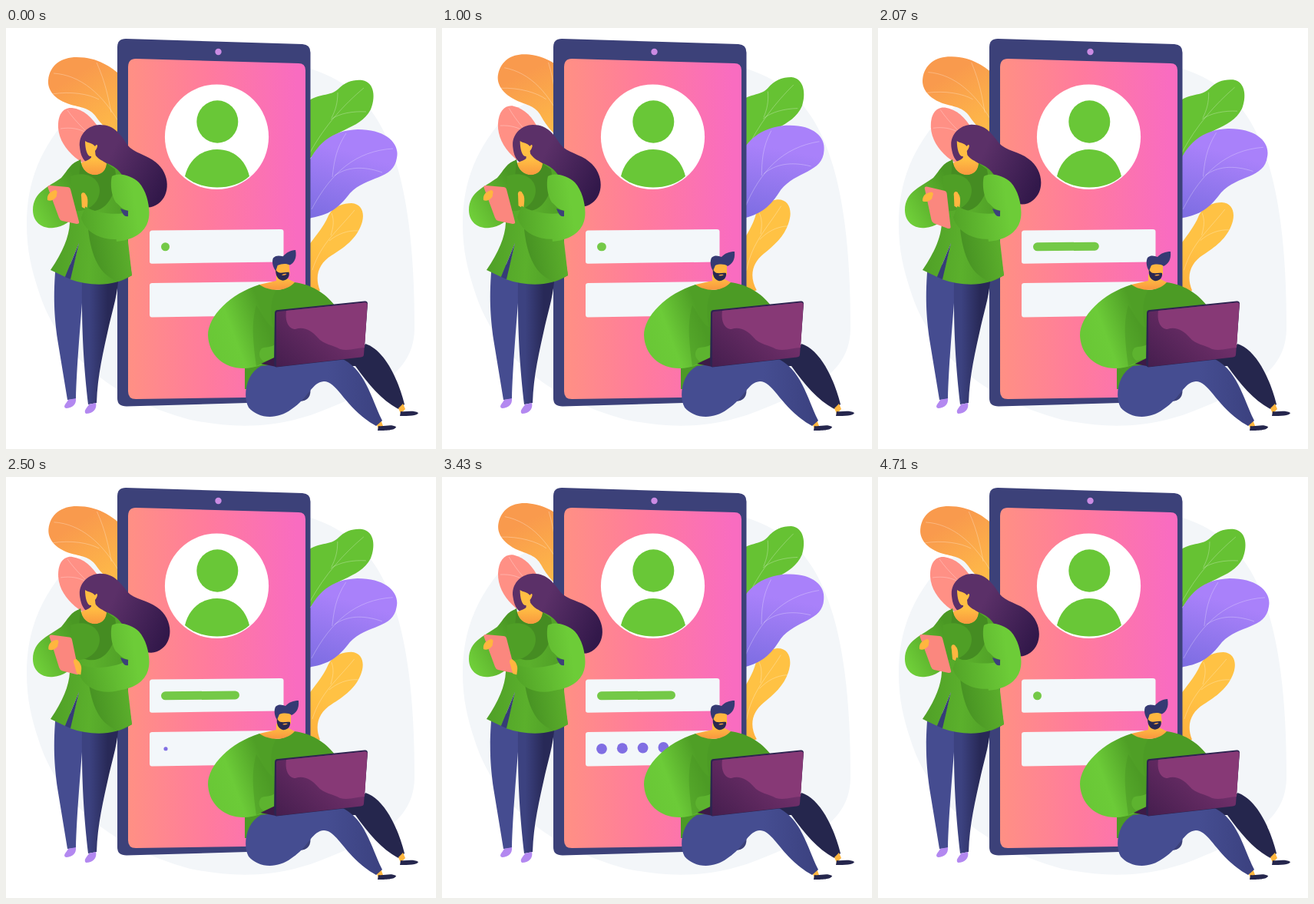
An HTML page that plays this animation: 560x548 px, repeating every 4.78 s.

```html
<!DOCTYPE html>
<html lang="en">
<head>
<meta charset="utf-8">
<title>Sign in</title>
<style>
html, body { margin: 0; width: 100%; height: 100%; overflow: hidden; background: #fff; }
svg { display: block; width: 100%; height: 100%; }
.vein { fill: none; stroke: #fff; stroke-opacity: .3; stroke-width: .9; }
</style>
</head>
<body>
<svg viewBox="0 0 560 548">
<defs>
  <linearGradient id="screen"><stop offset="0" stop-color="#ff9084"/><stop offset=".45" stop-color="#ff7b9d"/><stop offset=".95" stop-color="#f96cc0"/></linearGradient>
  <linearGradient id="orange" x1=".2" y1="0" x2=".8" y2="1"><stop offset=".2" stop-color="#f99a4d"/><stop offset="1" stop-color="#ffc247"/></linearGradient>
  <linearGradient id="violet" x1=".3" y1="1" x2=".6" y2="0"><stop offset="0" stop-color="#7d6de2"/><stop offset=".75" stop-color="#a981fa"/></linearGradient>
  <linearGradient id="yellow" x1=".3" y1="1" x2=".6" y2="0"><stop offset="0" stop-color="#ffb13e"/><stop offset=".5" stop-color="#ffc244"/></linearGradient>
  <linearGradient id="hair" x1="0" y1=".2" x2="1" y2=".7"><stop offset=".35" stop-color="#5b3068"/><stop offset="1" stop-color="#32184a"/></linearGradient>
  <linearGradient id="skin" x1="0" y1="0" x2="0" y2="1"><stop offset=".3" stop-color="#ffbe43"/><stop offset="1" stop-color="#f9973f"/></linearGradient>
  <linearGradient id="tunic" x1="0" y1=".6" x2="1" y2=".7"><stop offset="0" stop-color="#4f9f27"/><stop offset=".5" stop-color="#5bb02c"/><stop offset="1" stop-color="#4c9a25"/></linearGradient>
  <linearGradient id="fold" x1="0" y1=".6" x2="1" y2=".4"><stop offset="0" stop-color="#458f22"/><stop offset="1" stop-color="#5cb02c"/></linearGradient>
  <linearGradient id="sleeveLeft" gradientUnits="userSpaceOnUse" x1="36" y1="240" x2="96" y2="205"><stop offset="0" stop-color="#6fce39"/><stop offset=".45" stop-color="#5eb42e"/><stop offset="1" stop-color="#4a9824"/></linearGradient>
  <linearGradient id="sleeveRight" gradientUnits="userSpaceOnUse" x1="96" y1="250" x2="178" y2="238"><stop offset="0" stop-color="#52a427"/><stop offset=".9" stop-color="#6dcc38"/></linearGradient>
  <linearGradient id="arm" x1="0" y1=".7" x2="1" y2=".25"><stop offset="0" stop-color="#69c736"/><stop offset=".35" stop-color="#6ccb38"/><stop offset=".8" stop-color="#4f9f26"/></linearGradient>
  <linearGradient id="legDark"><stop offset=".2" stop-color="#3c4280"/><stop offset=".7" stop-color="#282957"/></linearGradient>
  <linearGradient id="legFront"><stop offset=".6" stop-color="#454d91"/><stop offset="1" stop-color="#3b417f"/></linearGradient>
  <linearGradient id="lid" x1="0" y1="1" x2=".9" y2=".3"><stop offset="0" stop-color="#451e4e"/><stop offset="1" stop-color="#793370"/></linearGradient>
</defs>

<path fill="#f3f6f9" d="M27 255C27 200 45 155 85 112C200 40 380 10 460 90C518 145 532 265 532 390C532 450 480 470 420 495C350 525 290 520 240 510C130 480 70 420 45 350C33 315 27 290 27 255Z"/>

<g id="leafOrange">
  <path fill="url(#orange)" d="M165 155C140 140 128 130 119 118C110 104 100 104 85 100C62 93 54 80 55 68C57 48 72 38 92 38C120 38 137 51 150 62Z"/>
  <path class="vein" d="M62 59C96 61 126 85 150 128M118 45C130 72 133 90 137 110M60 86C85 82 108 86 121 93"/>
</g>
<g id="leafPink">
  <path fill="#ff9085" d="M68 130C67 112 75 103 86 104C101 106 112 116 122 132L130 185C104 184 70 160 68 130Z"/>
  <path class="vein" d="M80 107C92 124 108 138 124 152M71 131C84 129 95 131 104 136"/>
</g>
<g id="leafGreen">
  <path fill="#66c233" d="M385 104C402 82 420 91 432 80C442 70 452 67 464 68C481 71 481 92 475 106C460 135 424 128 398 168L380 180Z"/>
  <path class="vein" d="M466 78C440 100 416 126 396 162M432 84C432 98 429 107 424 117M469 109C452 108 434 111 423 119"/>
</g>
<g id="leafYellow">
  <path fill="url(#yellow)" d="M385 295C402 272 414 259 420 244C427 231 440 228 450 228C463 229 467 240 464 252C458 274 440 286 424 296C408 306 401 322 409 342L395 346Z"/>
  <path class="vein" d="M454 237C432 264 410 280 399 315M424 241C428 251 426 260 423 270M459 264C445 263 432 268 421 277"/>
</g>
<g id="leafViolet">
  <path fill="url(#violet)" d="M385 252L390 185C403 150 425 133 458 132C495 132 513 150 509 169C505 198 470 192 448 215C432 236 420 243 398 247Z"/>
  <path class="vein" d="M504 157C456 160 424 187 398 236M443 137C429 158 427 177 425 194M490 188C464 179 444 181 428 192"/>
</g>

<path fill="#3c4179" d="M145 25Q145 14 156 14L386 21Q396.500 21.500 396.500 32V472Q396.500 485 383 486L157 492.500Q145 492.500 145 482Z"/>
<path fill="url(#screen)" d="M159 51Q159 40 169 40L381 46Q390 46 390 55V471Q390 480 381 480L169 483Q159 483 159 473Z"/>
<circle cx="276.500" cy="31" r="4.200" fill="#cb8be3"/>
<ellipse cx="274.500" cy="141.800" rx="67.600" ry="68.300" fill="#fff"/>
<g fill="#69c737">
  <ellipse cx="275.300" cy="122" rx="27" ry="27.700"/>
  <path d="M233 193C238 172 254 158 275 158C297 158 312 172 317 193C306 203 291 207.500 275 207.500C259 207.500 244 203 233 193Z"/>
</g>
<g fill="#f3f7fa">
  <path d="M187 267Q187 263.500 190.500 263.500L358 262Q361.500 262 361.500 265V301.500Q361.500 304.500 358 304.500L190 306.700Q187 306.700 187 304Z"/>
  <path d="M187 335Q187 332 190.500 332L358 330V374L190 376.500Q187 376.500 187 373Z"/>
</g>
<rect id="bar" x="202" y="279.300" width="11" height="11" rx="5.500" fill="#74c947" transform="rotate(-.5 207 285)"/>
<g id="dots" fill="#806ee3"></g>

<g id="woman">
  <path fill="#454c90" d="M65 306C61 350 63 375 67 405L80 484L91 483C92 440 97 385 100 345L104 310Z"/>
  <path fill="url(#legDark)" d="M99 320C98 400 102 445 107 490L118 488C119 452 127 420 134 388C139 366 146 345 147 318Z"/>
  <path fill="#b388f0" d="M91 482C92 490 86 495 78 495C73 493 79 488 81 484ZM117 488C119 496 113 502 104 502C100 498 107 493 108 490Z"/>
  <g id="hairGroup"><path fill="url(#hair)" d="M96 155C94 138 108 126 122 126C142 126 150 140 158 152C166 163 184 165 195 175C214 190 214 218 198 229C191 234 184 235 176 232L148 200C138 190 120 186 108 178C99 171 97 165 96 155Z"/></g>
  <path fill="url(#skin)" d="M97 176C105 172 112 172 114 162C119 171 127 173 132 177V192H101Z"/>
  <path id="face" fill="#ffbe43" d="M103 147C107 150 112 149 116 154C119 149 121 154 116 160L117 169L111 172V167C106 168 103 158 103 147Z"/>
  <path fill="url(#tunic)" d="M97 171C98 188 112 194 122 190C129 187 131 181 131 176C148 182 160 196 160 230L158 285L164 322C142 336 112 337 83 327L95 280L77 324L58 315C74 292 83 270 83 252L80 190C86 180 91 175 97 171Z"/>
  <path fill="#363c77" d="M95 280L77 324L84 327Z"/>
  <path fill="#458c22" d="M97 171C98 188 112 194 122 190C128 188 131 181 131 176L142 184C148 212 130 248 100 236L82 222V188Z"/>
  <path fill="url(#fold)" d="M107 262C111 298 122 322 146 330L164 322L158 270Z"/>
  <path fill="url(#sleeveLeft)" d="M97 172C85 174 80 186 72 195C57 206 35 213 35 237C35 253 48 262 62 260C74 259 84 252 90 243L94 205Z"/>
  <path fill="#4f9f26" d="M84 193C104 185 122 195 122 212C121 230 104 240 88 238Z"/>
  <g id="tabletGroup">
    <path fill="#fb877e" d="M57 205L80 207Q83 207 84 210L95 252Q96 255 92 255L73 251Q70 250 69 247L55 209Q53 205 57 205Z"/>
    <path fill="#ffb63f" d="M54 224C53 216 58 213 64 211C69 212 65 217 66 219C63 224 57 226 54 224Z"/>
  </g>
  <g id="forearm">
    <path id="hand" fill="#ffb640" d="M93 226C91 219 97 219 98 222C103 226 102 236 102 242L95 239Z"/>
    <path fill="url(#sleeveRight)" d="M101 238C115 245 140 246 158 240L174 264C150 284 108 281 97 253Z"/>
  </g>
  <path fill="url(#sleeveRight)" d="M138 193C146 187 164 192 173 201C184 213 188 235 186 247C183 266 166 276 144 278L140 246C150 245 157 242 160 238C151 236 149 232 143 227C136 216 136 200 138 193Z"/>
  <path fill="#3c4179" d="M149 235Q154 237 159 238V245Q153 247 149 235Z"/>
</g>

<g id="man">
  <path fill="#25264d" d="M430 426C455 425 465 418 468 411C490 418 509 450 519 490L511 496C490 485 472 464 455 440L432 440Z"/>
  <path fill="#ffb63f" d="M511 495L517 489L520 496L514 502ZM482 514L488 510L491 518L485 522Z"/>
  <path fill="#25264d" d="M514 499C521 500 530 497 537 501C536 505 524 505 513 505ZM485 518C493 519 501 515 508 519C507 524 494 524 484 524Z"/>
  <path fill="#4c9b25" d="M330 334C345 344 364 343 375 331C396 333 416 345 428 361L430 438L330 470L311 470V410Z"/>
  <path fill="url(#arm)" d="M330 334C292 346 263 375 263 400C264 426 284 443 309 443C326 443 340 436 350 429V395C342 376 345 350 352 341Z"/>
  <path fill="#4a9824" opacity=".5" d="M326 361C319 385 322 408 326 440L350 429V390C340 388 335 374 326 361Z"/>
  <g id="cuffMan"><path fill="#5db32f" d="M333 417C339 414 345 416 350 412V430L336 434C329 429 329 422 333 417Z"/></g>
  <path fill="url(#legFront)" d="M332 440C312 450 308 480 316 494C328 508 352 511 372 496C394 482 398 461 414 460C432 460 442 496 482 518L490 511C476 484 468 442 434 429L350 438Z"/>
  <path fill="url(#skin)" d="M352 321V329L330 334C344 344 366 343 376 331L366 326V318Z"/>
  <g id="headMan">
    <path fill="#ffb63f" d="M354 306L371 307L371 321L355 322C351 315 352 313 354 314Z"/>
    <path fill="#292850" d="M353 314C356 322 363 318 370 319C371 327 364 330 360 329C354 327 352 321 353 314Z"/>
    <path fill="#f3a042" d="M360 322Q363 320 367 321Q364 323.500 360 322Z"/>
    <path fill="#353a73" d="M353 316C349 310 349 303 351 299C356 295 360 297 364 298C369 293 374 291 381 291C382 302 378 307 372 310C368 307 361 307 356 309Z"/>
  </g>
  <g id="base"><path fill="#3c1b46" d="M331 437L350 428L362 438L351 441Z"/></g>
  <path fill="#2e2450" d="M350 371Q350 367 354 367L467 355.500Q471 355 471 359L466 425Q466 429 462 429L352 441.500Q349 441 349 437Z"/>
  <path fill="url(#lid)" d="M352 372Q352 369 355 369L467 357.500Q471 357 470.500 361L466 425Q466 428 462 428.500L352 441Z"/>
  <path fill="#873976" d="M365 368L467 357.500Q471 357 470.500 361L467 416C457 416 447 421 435 418C425 412 413 412 406 403C398 394 388 388 377 392C368 392 363 382 365 368Z"/>
</g>
</svg>
<script>
const LOOP = 4780, TAU = Math.PI * 2;
const $ = id => document.getElementById(id);
const wave = (t, cycles, peak = 0) => Math.cos(TAU * cycles * (t - peak) / LOOP);
const ramp = (t, from, to) => {
  const u = Math.min(1, Math.max(0, (t - from) / (to - from)));
  return (1 - Math.cos(Math.PI * u)) / 2;
};
const place = (id, value) => $(id).setAttribute('transform', value);

// id, swing in degrees, pivot
const leaves = [
  ['leafOrange', 7.6, '130 210'],
  ['leafPink', 5.7, '115 180'],
  ['leafGreen', -4.8, '410 180'],
  ['leafViolet', -5.8, '400 285'],
  ['leafYellow', -7.5, '404 335']
];

// age in ms, radius
const pop = [[0, 0], [70, 1.5], [200, 6], [330, 8.2], [460, 6.9]];
function popRadius(age) {
  if (age <= 0) return 0;
  for (let i = 1; i < pop.length; i++) {
    const [a, ra] = pop[i - 1], [b, rb] = pop[i];
    if (age < b) return ra + (rb - ra) * (age - a) / (b - a);
  }
  return pop[pop.length - 1][1];
}

const dots = [0, 1, 2, 3].map(i => {
  const dot = document.createElementNS('http://www.w3.org/2000/svg', 'circle');
  dot.setAttribute('cx', 208 + 26.8 * i);
  dot.setAttribute('cy', 353.8 - .6 * i);
  return $('dots').appendChild(dot);
});

function draw(t) {
  const sway = (1 - wave(t, 2)) / 2;
  for (const [id, deg, pivot] of leaves) place(id, `rotate(${deg * sway} ${pivot})`);

  const lift = (1 - wave(t, 1, 300)) / 2;
  place('hairGroup', `translate(${-4 * sway}) rotate(${-4.3 * lift} 120 150)`);
  place('face', `translate(${-1.5 * sway})`);

  const tap = wave(t, 5, 96);
  place('forearm', `rotate(${7 * tap} 158 258)`);
  place('hand', `translate(${2 * tap} ${4 - 5 * tap})`);

  const off = Math.min(1, Math.abs(t - 1950) / 900);
  const tilt = Math.cos(off * Math.PI / 2) ** 2;
  place('tabletGroup', `translate(${3 * tilt} ${4 * tilt}) rotate(${8.6 * tilt} 75 230)`);

  const nod = 1 - ramp(t, 0, 500) + ramp(t, 4000, 4700);
  place('headMan', `rotate(${-5 * nod} 355 335)`);
  const type = wave(t, 2, 1700);
  place('base', `translate(${2 + 3 * type})`);
  place('cuffMan', `translate(${1.5 * type} ${-type})`);

  const out = ramp(t, 3900, 4400);
  $('bar').setAttribute('width', 11 + 91 * (ramp(t, 900, 2520) - out));
  dots.forEach((dot, i) => dot.setAttribute('r', popRadius(t - 2400 - 130 * i) * (1 - out)));
}

const start = performance.now();
function tick() {
  draw((performance.now() - start) % LOOP);
  requestAnimationFrame(tick);
}
tick();
</script>
</body>
</html>
```
